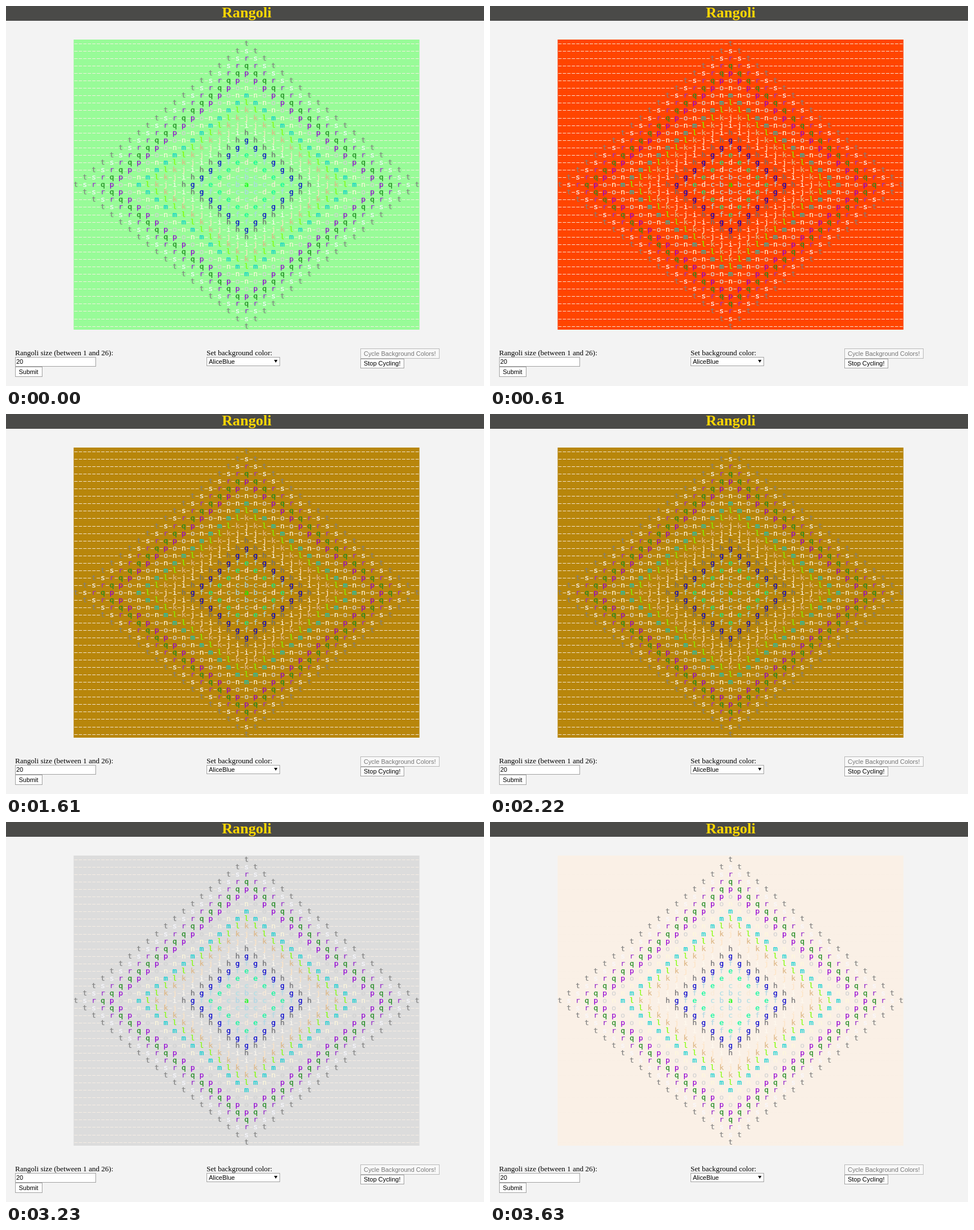
These frames come from a looping animation (839x668 px, 4.24 s). An HTML page:

```html
<!DOCTYPE html>
<html lang="en">
<head>
<meta charset="utf-8">
<title>Rangoli</title>
<style>
  html, body { margin: 0; width: 100%; height: 100%; overflow: hidden; background: #f3f3f3; }
  svg { display: block; }
  .crisp rect { shape-rendering: crispEdges; }
  .mono { font: 13.07px "DejaVu Sans Mono", monospace; text-anchor: middle; stroke-width: .2; }
  .serif { font: 13.07px "Liberation Serif", serif; }
  .sans { font: 10.95px "Liberation Sans", sans-serif; }
  .title { font: bold 26.1px "Liberation Serif", serif; text-anchor: middle; fill: gold; }
</style>
</head>
<body>
<svg id="stage" width="839" height="668" viewBox="0 0 839 668">
  <rect width="839" height="668" fill="#f3f3f3"/>
  <rect width="839" height="26" fill="#4a4a48"/>
  <text class="title" x="422.5" y="20">Rangoli</text>
  <rect id="panel" x="118.7" y="59" width="607" height="510"/>
  <path id="dashes" stroke="linen" fill="none" stroke-opacity=".9"/>
  <g id="letters" class="mono"></g>
  <g class="serif">
    <text x="16" y="614">Rangoli size (between 1 and 26):</text>
    <text x="352" y="614">Set background color:</text>
  </g>
  <g id="controls" class="sans crisp"></g>
</svg>
<script>
const NS = "http://www.w3.org/2000/svg";
const $ = id => document.getElementById(id);

function add(parent, tag, attrs, text) {
  const el = document.createElementNS(NS, tag);
  for (const key in attrs) el.setAttribute(key, attrs[key]);
  if (text) el.textContent = text;
  parent.appendChild(el);
  return el;
}

const SIZE = 20, CELL = 7.88, LINE = 13.075, MID = 422.2;
const INK = {
  a: "lime", b: "lightblue", c: "powderblue", d: "antiquewhite",
  e: "mediumspringgreen", f: "lightblue", g: "mediumblue", h: "#707074",
  i: "floralwhite", j: "bisque", k: "burlywood", l: "chartreuse",
  m: "darkturquoise", n: "cornsilk", o: "lightgray", p: "darkviolet",
  q: "forestgreen", r: "darkorchid", s: "ghostwhite", t: "gray"
};

function drawRangoli() {
  const half = 2 * (SIZE - 1);
  let d = "";
  for (let row = 0; row <= half; row++) {
    const reach = Math.min(row, half - row);
    const y = Math.floor(row * LINE + 0.28);  // snap to whole pixels
    for (let col = -half; col <= half; col++) {
      const x = MID + col * CELL;
      if (col % 2 === 0 && Math.abs(col) <= 2 * reach) {
        const rank = SIZE - 1 - reach + Math.abs(col) / 2;
        const ch = String.fromCharCode(97 + rank);
        add($("letters"), "text",
          { x: x.toFixed(2), y: 70 + y, fill: INK[ch], stroke: INK[ch] }, ch);
      } else {
        d += `M${(x - 2.9).toFixed(2)} ${66.5 + y}h5.8`;
      }
    }
  }
  $("dashes").setAttribute("d", d);
}

function box(x, y, w, h, label, pad, base, look = {}) {
  const g = $("controls");
  const edge = look.edge || "#a2a2a2";
  add(g, "rect", { x, y, width: w, height: h, fill: edge });
  add(g, "rect", { x: x + 1, y: y + 1, width: w - 2, height: h - 2, fill: look.fill || "#fdfdfd" });
  add(g, "text", { x: x + pad, y: base, fill: look.ink || "#000" }, label);
}

function drawControls() {
  box(16, 617, 142, 17, "20", 2, 629, { fill: "#fff" });
  box(16, 634, 48, 18, "Submit", 6.5, 647);
  box(352, 617, 129, 16, "AliceBlue", 4, 629, { fill: "#fff" });
  add($("controls"), "path", { d: "M470.5 622h6l-3 5z" });
  box(622, 602, 139, 18, "Cycle Background Colors!", 6, 615,
    { edge: "#b8b8b8", fill: "#f8f8f8", ink: "#777" });
  box(622, 620, 77, 17, "Stop Cycling!", 6, 632);
}

const LOOP = 4240;
const STEPS = [
  [0, "palegreen"], [610, "orangered"], [1610, "darkgoldenrod"],
  [2620, "gainsboro"], [3630, "linen"]
];

function render(ms) {
  const t = ms % LOOP;
  const step = STEPS.filter(([start]) => start <= t).pop();
  $("panel").setAttribute("fill", step[1]);
}

drawRangoli();
drawControls();
const begin = performance.now();
function tick() {
  render(performance.now() - begin);
  requestAnimationFrame(tick);
}
tick();
</script>
</body>
</html>
```
